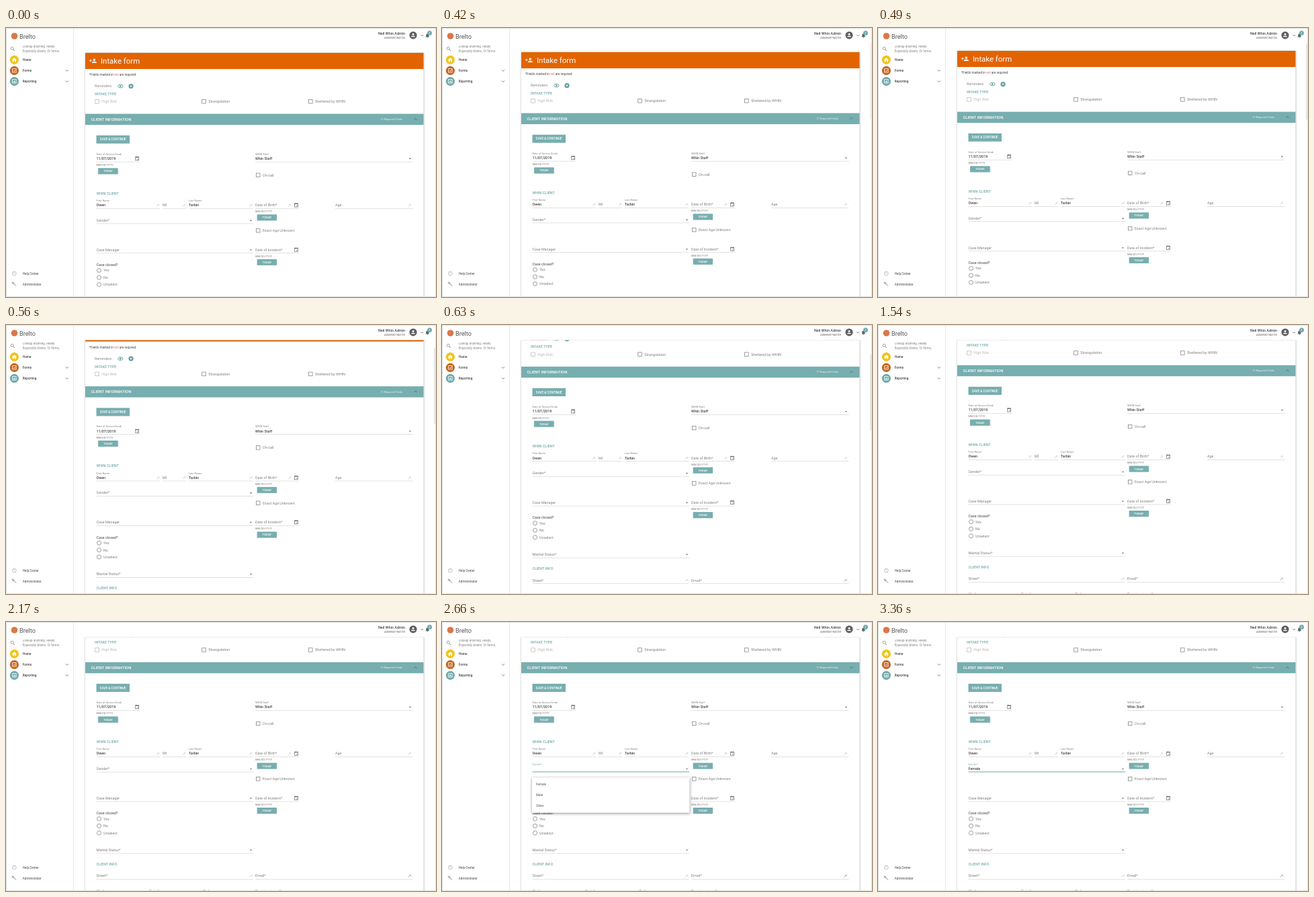
An HTML page with a canvas that plays this animation: 640 px wide and 400 px high, repeating every 3430 ms.

```html
<!DOCTYPE html>
<html lang="en">
<head>
<meta charset="utf-8">
<title>Intake form</title>
<style>
  html, body { margin: 0; width: 100%; height: 100%; overflow: hidden; background: #fff; }
  canvas { display: block; width: 640px; height: 400px; }
</style>
</head>
<body>
<canvas id="stage"></canvas>
<script>
const LOOP = 3430;
const TEAL = '#77aeaf', HEADING = '#74aaab', ORANGE = '#e26401';
const INK = '#444', GREY = '#808080', RULE = '#cfcfcf';
const canvas = document.getElementById('stage');
const ctx = canvas.getContext('2d');
const ratio = window.devicePixelRatio || 1;
canvas.width = 640 * ratio;
canvas.height = 400 * ratio;

const clamp = v => Math.max(0, Math.min(1, v));
const easeOut = v => 1 - (1 - v) ** 3;
const progress = (t, from, length) => easeOut(clamp((t - from) / length));
const mix = (a, b, k) => a + (b - a) * k;

// Time and page offset pairs: a slow start, one quick flick, a soft stop.
const SCROLL = [[350, 0], [420, 1], [490, 2.5], [560, 36], [630, 65.7], [700, 66.6], [910, 67.8]];

function scrollAt(t) {
  if (t <= SCROLL[0][0]) return 0;
  for (let i = 1; i < SCROLL.length; i++) {
    const [t0, y0] = SCROLL[i - 1], [t1, y1] = SCROLL[i];
    if (t < t1) return mix(y0, y1, (t - t0) / (t1 - t0));
  }
  return SCROLL[SCROLL.length - 1][1];
}

// Text is placed by the middle of its capitals.
function text(s, x, y, size = 5.4, color = GREY, weight = 400, align = 'left') {
  ctx.font = `${weight} ${size}px Roboto, sans-serif`;
  ctx.textAlign = align;
  ctx.fillStyle = color;
  ctx.fillText(s, x, y + size * 0.36);
}

function rect(x, y, w, h, color) {
  ctx.fillStyle = color;
  ctx.fillRect(x, y, w, h);
}

function frame(x, y, w, h, color, width = 0.8) {
  ctx.strokeStyle = color;
  ctx.lineWidth = width;
  ctx.strokeRect(x, y, w, h);
}

function disc(x, y, r, color) {
  ctx.fillStyle = color;
  ctx.beginPath();
  ctx.arc(x, y, r, 0, 7);
  ctx.fill();
}

function ring(x, y, r, color, width = 0.8) {
  ctx.strokeStyle = color;
  ctx.lineWidth = width;
  ctx.beginPath();
  ctx.arc(x, y, r, 0, 7);
  ctx.stroke();
}

function line(points, color, width = 0.8) {
  ctx.strokeStyle = color;
  ctx.lineWidth = width;
  ctx.beginPath();
  points.forEach(([x, y]) => ctx.lineTo(x, y));
  ctx.stroke();
}

function poly(points, color) {
  ctx.fillStyle = color;
  ctx.beginPath();
  points.forEach(([x, y]) => ctx.lineTo(x, y));
  ctx.fill();
}

function shadowed(blur, dy, alpha, draw) {
  ctx.save();
  ctx.shadowColor = `rgba(0,0,0,${alpha})`;
  ctx.shadowBlur = blur * ratio;
  ctx.shadowOffsetY = dy * ratio;
  draw();
  ctx.restore();
}

const rule = (x0, x1, y) => rect(x0, y, x1 - x0, 0.6, RULE);
const arrow = (x, y) => poly([[x - 1.8, y - 0.8], [x + 1.8, y - 0.8], [x, y + 1.1]], '#777');
const chevron = (x, y) => line([[x - 2, y - 1], [x, y + 1], [x + 2, y - 1]], '#666');

function person(x, y, r, color) {
  disc(x, y - r * 0.5, r * 0.5, color);
  ctx.beginPath();
  ctx.ellipse(x, y + r * 0.85, r, r * 0.65, 0, Math.PI, 0);
  ctx.fill();
}

function wand(x, y, color = '#b5b5b5') {
  line([[x - 2, y + 2], [x + 1, y - 1]], color, 0.6);
  line([[x - 0.5, y - 1.2], [x + 1.8, y - 1.2], [x + 1.8, y + 0.8]], color, 0.5);
}

function calendar(x, y) {
  const color = '#6b6b6b';
  frame(x - 2.5, y - 2.2, 5, 5, color, 0.7);
  rect(x - 2.5, y - 2.4, 5, 1.1, color);
  rect(x - 1.8, y - 3.2, 0.7, 0.9, color);
  rect(x + 1.1, y - 3.2, 0.7, 0.9, color);
  rect(x + 0.3, y + 0.6, 1.2, 1.2, color);
}

function button(label, x, y, w, h, size) {
  shadowed(1.5, 0.5, 0.22, () => rect(x, y - h / 2, w, h, TEAL));
  text(label, x + w / 2, y, size, '#fff', 500, 'center');
}

function checkbox(label, x, y, color = GREY) {
  frame(x - 2.8, y - 2.8, 5.6, 5.6, color, 0.75);
  text(label, x + 6.8, y, 5.4, color);
}

function radio(label, y) {
  ring(138.5, y, 3, '#777', 0.75);
  text(label, 145, y);
}

function field(label, x0, x1, y, value) {
  if (value) {
    text(label, x0, y - 6.7, 4);
    text(value, x0, y, 5.4, INK, 500);
  } else {
    text(label, x0, y);
  }
  rule(x0, x1, y + 4.8);
}

function dateHint(x, y) {
  text('MM/DD/YYYY', x, y, 4);
  button('TODAY', x + 2.7, y + 9, 29.3, 9, 4.4);
}

function titleBar() {
  rect(118, 37, 503.5, 24, ORANGE);
  person(131.3, 49, 3.6, '#fff');
  rect(124, 48, 3.6, 0.9, '#fff');
  rect(125.35, 46.6, 0.9, 3.7, '#fff');
  text('Intake form', 141, 49, 11.4, '#fff');
}

function intro() {
  ctx.font = '400 4.65px Roboto, sans-serif';
  let x = 124;
  for (const [part, color] of [['*Fields marked in ', INK], ['red', '#df7470'], [' are required', INK]]) {
    text(part, x, 69.7, 4.65, color);
    x += ctx.measureText(part).width;
  }
  text('Reminders', 132, 86.5, 5.3, '#888');
  ctx.strokeStyle = '#5f9a9b';
  ctx.lineWidth = 0.9;
  ctx.beginPath();
  ctx.ellipse(170.3, 86.5, 3.7, 2.4, 0, 0, 7);
  ctx.stroke();
  disc(170.3, 86.5, 1.3, '#5f9a9b');
  disc(186, 86.5, 3.6, '#5f9a9b');
  rect(184, 86.1, 4, 0.8, '#fff');
  rect(185.6, 84.5, 0.8, 4, '#fff');
  text('INTAKE TYPE', 132, 98.3, 5.3, HEADING, 500);
  checkbox('High Risk', 135.5, 109.3, '#b8b8b8');
  checkbox('Strangulation', 294.5, 109.3);
  checkbox('Sheltered by WHIN', 453.3, 109.3);
}

function clientSection() {
  rect(118, 127.6, 503.5, 16.4, TEAL);
  text('CLIENT INFORMATION', 126.5, 135.6, 5.85, '#fff', 500);
  text('11 Required Fields', 557, 135.6, 4, '#eef7f7');
  line([[607.5, 136.4], [609.5, 134.4], [611.5, 136.4]], '#456f70', 0.9);

  button('SAVE & CONTINUE', 134.5, 165.7, 49.5, 12, 4.6);

  field('Date of Service/Intak', 134.5, 199, 194, '11/07/2019');
  calendar(195.2, 194);
  dateHint(134.5, 203.8);
  field('WHIN Staff', 371, 605.5, 194, 'Whin Staff');
  arrow(601.5, 194.4);
  checkbox('On-call', 375.2, 218.8);

  text('WHIN CLIENT', 134.5, 245.8, 5.4, HEADING, 500);
  field('First Name', 134.5, 229.5, 263.3, 'Owen');
  field('MI', 233, 268.5, 263.3);
  field('Last Name', 272, 367.5, 263.3, 'Tarbin');
  field('Date of Birth*', 371, 436, 263.3);
  field('Age', 490, 605.5, 263.3);
  [226, 265, 364, 422, 600.5].forEach(x => wand(x, 263.6));
  calendar(432, 263.3);
  dateHint(371, 272.8);
  checkbox('Exact Age Unknown', 375.2, 301.1);

  field('Case Manager', 134.5, 368, 329.7);
  arrow(364.5, 330);
  field('Date of Incident*', 371, 436, 329.7);
  calendar(432, 329.5);
  dateHint(371, 339.3);

  text('Case closed?', 134.5, 352.2, 5.4, INK);
  radio('Yes', 360.4);
  radio('No', 371);
  radio('Unselect', 381.4);

  field('Marital Status*', 134.5, 368, 406.8);
  arrow(364.5, 407);
  text('CLIENT INFO', 134.5, 427.8, 5.3, HEADING, 500);
  field('Street*', 134.5, 367.5, 445.3);
  field('Email*', 371, 605.5, 445.3);
  wand(364, 445.5);
  wand(600.5, 445.5, '#777');
  [['City*', 134.5], ['State*', 213], ['Zip*', 293], ['Best time to call', 371]]
    .forEach(([label, x]) => text(label, x, 468.3));
}

function gender(t) {
  const float = progress(t, 2240, 150);
  text('Gender*', 134.5, mix(285.8, 279, float), mix(5.4, 4, float), float > 0 ? '#85abac' : GREY);
  if (t >= 2940) text('Female', 134.5, 285.8, 5.4, INK, 500);
  rule(134.5, 368, 290.6);
  if (float > 0) {
    const half = 116.75 * float;
    rect(251.25 - half, 290.2, half * 2, 0.9, TEAL);
  }
  arrow(364.5, 286.3);
}

function menu(t) {
  const opening = progress(t, 2260, 150);
  const alpha = clamp(opening * 1.5) * (1 - clamp((t - 2940) / 110));
  if (alpha <= 0) return;
  const height = 52.5 * mix(0.6, 1, opening);
  ctx.save();
  ctx.globalAlpha = alpha;
  shadowed(4, 1.2, 0.4, () => rect(134, 299, 234.5, height, '#fff'));
  ctx.beginPath();
  ctx.rect(134, 299, 234.5, height);
  ctx.clip();
  ['Female', 'Male', 'Other'].forEach((item, i) => text(item, 140, 309 + i * 15.9, 4.6, '#555'));
  ctx.restore();
}

function page(t) {
  const offset = scrollAt(t);
  ctx.save();
  ctx.beginPath();
  ctx.rect(101, 22.6, 538, 377.4);
  ctx.clip();
  ctx.translate(0, -offset);
  shadowed(2.5, 0.4, 0.3, () => rect(118, 37, 503.5, 500, '#fff'));
  titleBar();
  intro();
  clientSection();
  gender(t);
  menu(t);
  ctx.restore();

  const bar = clamp((t - 380) / 70) * (1 - clamp((t - 980) / 70));
  rect(637.2, 22 + offset * 0.33, 1.6, 113, `rgba(222,222,222,${bar})`);
}

function navItem(label, y, color, expandable) {
  disc(12.4, y, 6.6, color);
  text(label, 24.8, y, 4.7, INK, 500);
  if (expandable) chevron(91, y);
}

function sidebar() {
  rect(100, 0, 0.8, 400, '#e2e2e2');
  disc(12.5, 12, 4.8, '#d9774a');
  text('Brelto', 20, 12.5, 9.2, '#555');

  ring(9.2, 30.3, 2, '#888');
  line([[10.7, 31.8], [13, 34]], '#888', 1);
  ctx.save();
  ctx.beginPath();
  ctx.rect(20, 26, 78, 14);
  ctx.clip();
  text('Lookup anything. Ready', 24.8, 27.4, 4.5);
  text('Especially clients. Or forms.', 24.8, 34.6, 4.5);
  ctx.restore();

  navItem('Home', 47.3, '#f2c41c');
  poly([[8.8, 47.5], [12.4, 44.2], [16, 47.5], [15, 47.5], [15, 50.3], [9.8, 50.3], [9.8, 47.5]], '#fff');
  rect(11.7, 48.2, 1.4, 2.1, '#f2c41c');

  navItem('Forms', 63.3, '#c8641f', true);
  frame(9.7, 60.6, 5.4, 5.4, '#fff');
  line([[10.9, 63.4], [12.1, 64.6], [14.3, 62]], '#fff');

  navItem('Reporting', 79.3, '#72aaab', true);
  frame(9.7, 76.6, 5.4, 5.4, '#fff');
  [[10.8, 2], [12.1, 3], [13.4, 1.5]].forEach(([x, h]) => rect(x, 81 - h, 0.7, h, '#fff'));

  ring(12.3, 365, 2.9, '#999', 0.6);
  text('?', 12.3, 365, 4, '#888', 400, 'center');
  text('Help Center', 24.8, 365, 4.6, INK);
  line([[10.8, 379.3], [15, 383.5]], '#808080', 1);
  ring(10.4, 379, 1.2, '#808080', 0.8);
  text('Administrator', 24.8, 381, 4.6, INK);
}

function header() {
  text('Neil Whin Admin', 594, 7.8, 5.4, INK, 500, 'right');
  text('ADMINISTRATOR', 594, 15, 4, '#666', 400, 'right');
  disc(606, 10.8, 5.6, '#606060');
  person(606, 10.8, 2.9, '#fff');
  chevron(619.2, 11);
  poly([[624.3, 13.2], [625.2, 12], [625.4, 9.5], [627.3, 8], [629.2, 9.5], [629.4, 12], [630.3, 13.2]], '#606060');
  disc(627.3, 14, 0.8, '#606060');
  disc(630.5, 7.6, 3.5, TEAL);
  text('1', 630.5, 7.6, 4, '#fff', 400, 'center');
}

function draw(now) {
  const t = now % LOOP;
  ctx.setTransform(ratio, 0, 0, ratio, 0, 0);
  rect(0, 0, 640, 400, '#fff');
  page(t);
  sidebar();
  header();
  frame(0.5, 0.5, 639, 399, '#e0e0e0', 1);
  requestAnimationFrame(draw);
}

requestAnimationFrame(draw);
</script>
</body>
</html>
```
